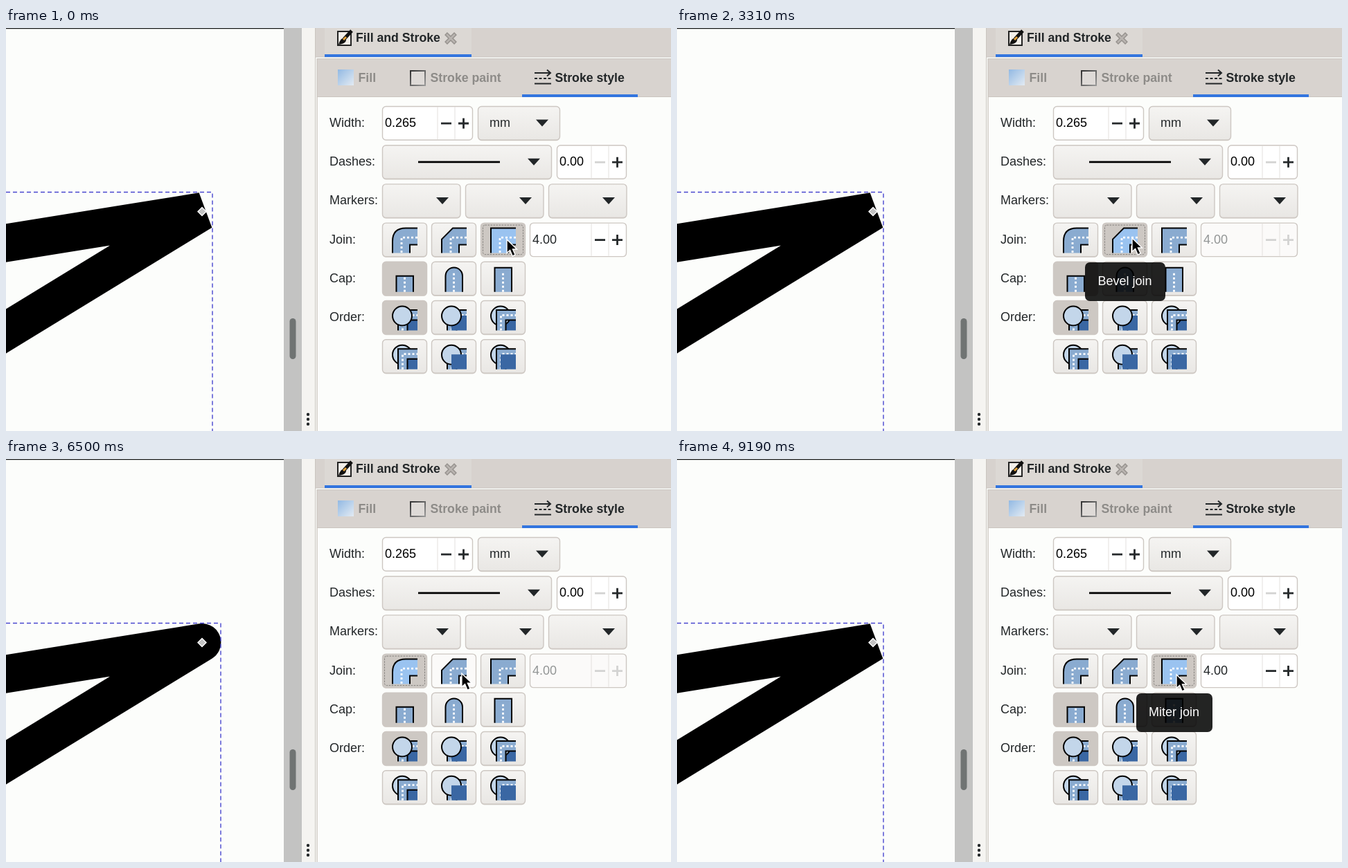
Animation of 960x583 px, one loop 9250 ms. Source, as an HTML page:

```html
<!DOCTYPE html>
<html lang="en">
<head>
<meta charset="utf-8">
<title>Stroke join styles</title>
<style>
  html, body { margin: 0; width: 100%; height: 100%; overflow: hidden; background: #fcfdfb; }
  svg { display: block; width: 100vw; height: 100vh; }
  text { font: 18px "Liberation Sans", Arial, sans-serif; fill: #222628; }
  .bold { font-weight: 700; font-size: 17.7px; }
  .muted { fill: #8d8b88; }
  .button { stroke: #cdc7c2; stroke-width: 1.4; }
  .entry { fill: #fff; stroke: #cdc7c2; stroke-width: 1.4; }
  .line { fill: none; stroke: #000; stroke-width: 2; }
  .dots { fill: none; stroke: #fff; stroke-width: 2.8; stroke-dasharray: 3 3; }
  .blue { fill: #8aabd0; }
  .focused .blue { fill: #9ac3f0; }
  .focus { display: none; fill: none; stroke: #85827e; stroke-dasharray: 2.5 1.5; }
  .focused .focus { display: inline; }
  .sign { stroke: #25292b; stroke-width: 2.8; }
  .disabled text { fill: #929595; }
  .disabled .sign, .sign.off { stroke: #d3d3d2; }
  .disabled .entry { fill: #fbfaf9; }
</style>
</head>
<body>
<svg viewBox="0 0 960 583" preserveAspectRatio="none">
  <defs>
    <linearGradient id="face" x2="0" y2="1">
      <stop stop-color="#f5f4f2"/><stop offset="1" stop-color="#e9e7e4"/>
    </linearGradient>
    <linearGradient id="sky" x2="1" y2="1">
      <stop stop-color="#92b9e3"/><stop offset="1" stop-color="#e3ebf3"/>
    </linearGradient>
    <linearGradient id="ink" x2="1" y2="1">
      <stop stop-color="#333"/><stop offset="1" stop-color="#999"/>
    </linearGradient>
  </defs>

  <rect width="960" height="583" fill="#fcfdfb"/>
  <path id="shape" d="M-60 320.6L283 265.3L-60 475.5" fill="none" stroke="#000" stroke-width="54.8"/>
  <path id="bounds" fill="none" stroke="#4745cf" stroke-width="1.4" stroke-dasharray="6 4"/>
  <path d="M283 259.5l6 6l-6 6l-6-6z" fill="#c4c4c4" stroke="#fff" stroke-width="1.4"/>
  <path d="M0 .5H401" stroke="#17191a" stroke-width="1.6"/>
  <rect x="401" width="26" height="583" fill="#c3c3c2"/>
  <rect x="409.5" y="420" width="9" height="59" rx="4.5" fill="#707473"/>
  <rect x="427" width="20" height="583" fill="#f5f4f1"/>
  <g fill="#25292b">
    <circle cx="436" cy="559" r="2.2"/><circle cx="436" cy="566" r="2.2"/><circle cx="436" cy="573" r="2.2"/>
  </g>

  <rect x="447" width="513" height="42" fill="#d7d2ce"/>
  <rect x="460" width="212" height="39" fill="#dcd8d4"/>
  <rect x="449" y="45" width="511" height="54" fill="#d8d3cf"/>
  <path d="M446.5 0V583M447 42H960M449 44.5H960M449 99.5H960" fill="none" stroke="#cac5bf"/>
  <path d="M449 44V583" stroke="#d0cbc5" stroke-width="1.5"/>
  <path d="M460 40H672M745 98H912" stroke="#3375df" stroke-width="4"/>

  <rect x="479" y="5" width="19" height="20" fill="#f3efe9" stroke="#222" stroke-width="2"/>
  <path d="M480 24Q483 13 490 14Q494 22 480 24z" fill="#111"/>
  <path d="M488 16L499 4" stroke="#111" stroke-width="5"/>
  <path d="M487 17L491 13" stroke="#e2a23b" stroke-width="3"/>
  <text class="bold" x="505" y="20">Fill and Stroke</text>
  <path d="M635 8L649 22M649 8L635 22" stroke="#96928e" stroke-width="5.5"/>
  <path d="M636 9L648 21M648 9L636 21" stroke="#b9b4b0" stroke-width="2.5"/>

  <rect x="479" y="60" width="23" height="23" fill="url(#sky)"/>
  <text class="bold muted" x="508.5" y="78">Fill</text>
  <rect x="584" y="62" width="21" height="21" fill="#dedad7" stroke="url(#ink)" stroke-width="2"/>
  <text class="bold muted" x="612.5" y="78">Stroke paint</text>
  <g stroke="#222628" stroke-width="2" fill="none">
    <path d="M763 65H786M781 60.5L786 65L781 69.5M763 80.5H787"/>
    <path d="M763 73H787" stroke-dasharray="4 2.5"/>
  </g>
  <text class="bold" x="792.5" y="78">Stroke style</text>

  <g id="controls"></g>
  <g id="tooltip">
    <rect y="339" height="56" rx="7" fill="#000" fill-opacity=".86"/>
    <text y="372" text-anchor="middle" style="fill:#fff"></text>
  </g>
  <path id="cursor" d="M0 0V19.5L4.6 15.4L8.2 24L12.2 22.2L8.5 14H14.5z" fill="#000" stroke="#fff" stroke-width="1.4"/>
</svg>
<script>
const LOOP = 9250;
const $ = id => document.getElementById(id);
const rowY = row => 113 + row * 56.2;
const columnX = column => 543 + column * 71;

const button = (x, row, width, icon = '', attrs = '') => `
  <g transform="translate(${x} ${rowY(row)})" ${attrs}>
    <rect x=".5" y="1.8" width="${width}" height="48.5" rx="5" fill="#d9d5d0"/>
    <rect class="button" x=".5" y=".5" width="${width}" height="48.5" rx="5" fill="url(#face)"/>
    <rect class="focus" x="3.5" y="3.5" width="${width - 6}" height="42.5" rx="3"/>${icon}
  </g>`;
const label = (row, text) => `<text x="467" y="${rowY(row) + 30}">${text}</text>`;
const arrow = (x, row) =>
  `<path d="M${x - 9} ${rowY(row) + 19.5}h18l-9 10z" fill="#222628"/>`;

// A number field whose last two cells hold the minus and plus signs.
function spinner(x, row, right, value, id = '', minusOff = '') {
  const y = rowY(row), mid = y + 25;
  return `<g id="${id}">
    <rect class="entry" x="${x + .5}" y="${y + .5}" width="${right - x}" height="48.5" rx="5"/>
    <path d="M${right - 50} ${y + 1}v47M${right - 25} ${y + 1}v47" stroke="#e3e0dd"/>
    <text x="${x + 4}" y="${y + 30}" style="${id ? '' : 'fill:#000'}">${value}</text>
    <path class="sign ${minusOff}" d="M${right - 45} ${mid}h15"/>
    <path class="sign" d="M${right - 20} ${mid}h15m-7.5-7.5v15"/></g>`;
}

const joinIcon = corner => `
  <path class="blue" d="M15 44V${corner}H51V32H40V44z"/>
  <path class="line" d="M15 44V${corner}H51M51 32H40V44"/>
  <path class="dots" d="M51 21.5H28V44"/>`;
const joinIcons = ['27Q15 8 34 8', '24L31 8', '8'].map(joinIcon);

const capIcon = (top, outline) => `
  <path class="blue" d="${outline}"/><path class="line" d="${outline}"/>
  <path class="dots" d="M32.5 ${top}V44"/>`;
const capIcons = [
  capIcon(23, 'M20.5 44V21H45V44'),
  capIcon(17, 'M20.5 44V21A12.2 12.2 0 0 1 45 21V44'),
  capIcon(17, 'M20.5 44V9H45V44')
];

const layers = {
  F: '<path d="M29 22H51V43.5H29z" fill="#3a67a3"/>',
  S: `<path class="blue" d="M23 43.5V14H51V28H36V43.5z"/>
      <path class="line" d="M23 43.5V14H51M51 28.5H36.5V43.5"/>
      <path class="dots" d="M29.5 43.5V21.5H51"/>`,
  M: '<circle class="line" cx="29" cy="22.5" r="14" style="fill:#c3d6ea"/>'
};
const orderIcons = ['FSM', 'SFM', 'FMS', 'MFS', 'SMF', 'MSF']
  .map(order => [...order].map(key => layers[key]).join(''));

const iconRow = (icons, row, prefix) =>
  icons.map((icon, i) => button(columnX(i), row, 64, icon, `id="${prefix}${i}"`)).join('');

$('controls').innerHTML =
  ['Width:', 'Dashes:', 'Markers:', 'Join:', 'Cap:', 'Order:'].map((text, row) => label(row, text)).join('') +
  spinner(543, 0, 673, '0.265') +
  button(681, 0, 118) + `<text x="698" y="${rowY(0) + 30}">mm</text>` + arrow(774, 0) +
  button(543, 1, 244) + '<path d="M595 193.8H713" stroke="#000" stroke-width="2.8"/>' + arrow(762, 1) +
  spinner(795, 1, 895, '0.00', '', 'off') +
  [0, 1, 2].map(i => button(543 + i * 120, 2, 112.5) + arrow(630 + i * 120, 2)).join('') +
  iconRow(joinIcons, 3, 'join') + spinner(756, 3, 895, '4.00', 'limit') +
  iconRow(capIcons, 4, 'cap') +
  iconRow(orderIcons.slice(0, 3), 5, 'order') + iconRow(orderIcons.slice(3), 6, 'layer');

const CHECKED = '#cdc8c3', FADING = '#dfdbd7', HOVER = '#fbfaf9';
const paint = (id, fill) => $(id).querySelector('.button').style.fill = fill;
paint('cap0', CHECKED);
paint('order0', CHECKED);

const ROUND = 0, BEVEL = 1, MITER = 2;
const clicks = [
  { press: -1000, release: -900, join: MITER },
  { press: 2300, release: 2420, join: BEVEL },
  { press: 5080, release: 5200, join: ROUND },
  { press: 7580, release: 7700, join: MITER }
];
const moves = [
  { from: 1050, to: 1720, x: 657, y: 304 },
  { from: 4100, to: 4800, x: 580, y: 308 },
  { from: 6180, to: 6780, x: 721, y: 312 }
];
const tips = [
  { from: 2950, to: 4100, text: 'Bevel join', x: 589, width: 116 },
  { from: 8250, to: LOOP, text: 'Miter join', x: 663, width: 110 }
];

function cursorAt(t) {
  let x = 723, y = 306;
  for (const move of moves) {
    const p = Math.min(1, Math.max(0, (t - move.from) / (move.to - move.from)));
    const eased = p * p * (3 - 2 * p);
    x += (move.x - x) * eased;
    y += (move.y - y) * eased;
  }
  return { x, y };
}

function draw(t) {
  const { x, y } = cursorAt(t);
  $('cursor').setAttribute('transform', `translate(${x} ${y})`);

  const pressed = clicks.findLast(click => t >= click.press);
  const index = clicks.findLastIndex(click => t >= click.release);
  const current = clicks[index], previous = clicks[index - 1];
  const fading = t - current.release < 200;

  for (let i = 0; i < 3; i++) {
    const left = columnX(i);
    let fill = x >= left && x <= left + 64 ? HOVER : 'url(#face)';
    if (i === pressed.join) fill = FADING;
    if (i === current.join) fill = fading ? FADING : CHECKED;
    else if (fading && previous && i === previous.join) fill = '#fff';
    paint('join' + i, fill);
    $('join' + i).classList.toggle('focused', i === pressed.join);
  }

  const round = current.join === ROUND;
  $('shape').setAttribute('stroke-linejoin', round ? 'round' : 'bevel');
  $('bounds').setAttribute('d', `M0 237.5H${round ? 310 : 298}V583`);
  $('limit').classList.toggle('disabled', current.join !== MITER);

  const tip = tips.find(item => t >= item.from && t < item.to);
  $('tooltip').style.display = tip ? '' : 'none';
  if (tip) {
    const [box, text] = $('tooltip').children;
    box.setAttribute('x', tip.x);
    box.setAttribute('width', tip.width);
    text.setAttribute('x', tip.x + tip.width / 2 - .5);
    text.textContent = tip.text;
  }
}

const start = performance.now();
function tick() {
  draw((performance.now() - start) % LOOP);
  requestAnimationFrame(tick);
}
tick();
</script>
</body>
</html>
```
